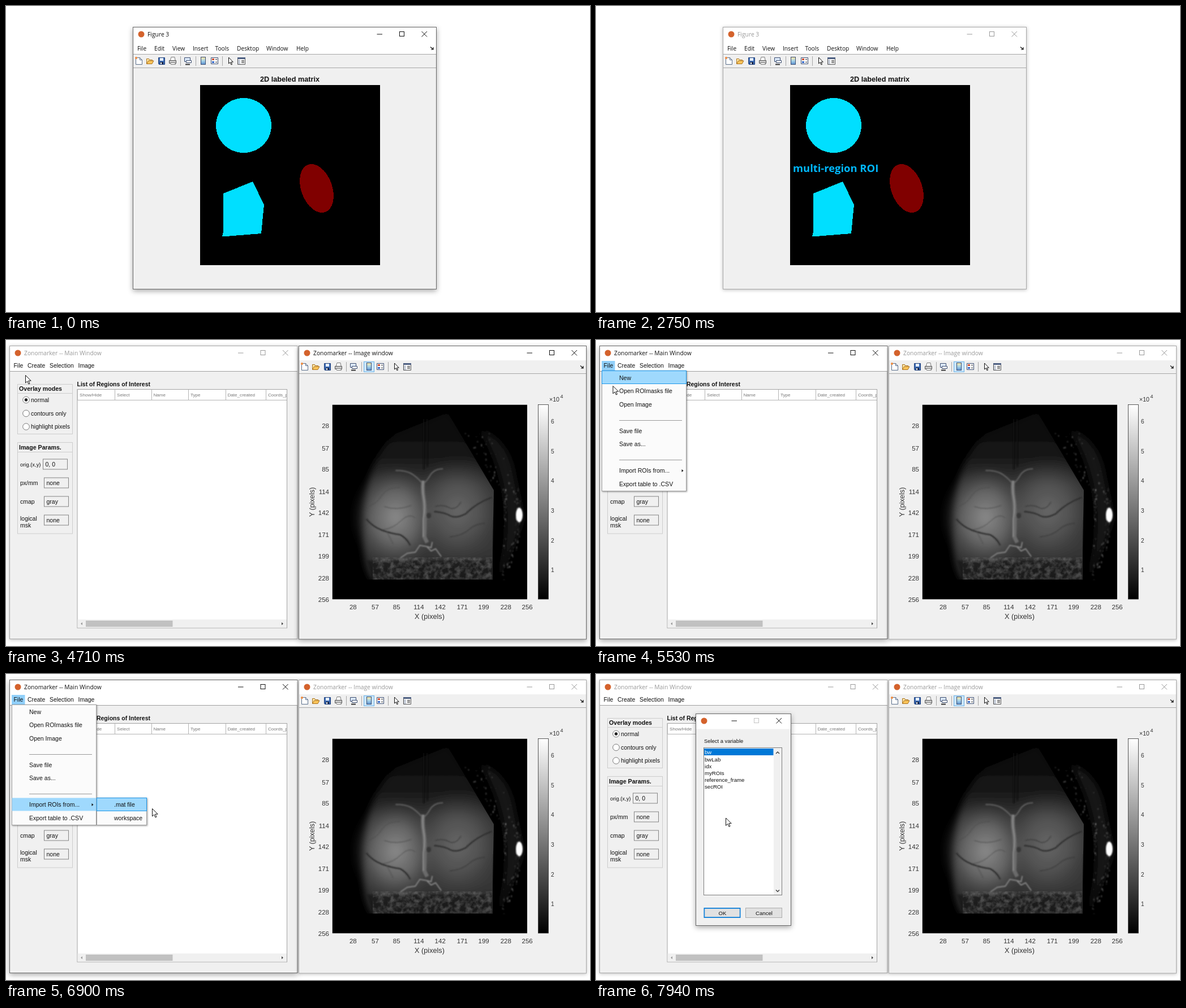
Recreate the animation shown at these times as an HTML page. Size 1032 by 542 pixels, loop 8 s.

```html
<!DOCTYPE html>
<html lang="en">
<head>
<meta charset="utf-8">
<title>Region tool demo</title>
<style>
html, body { margin: 0; width: 100%; height: 100%; overflow: hidden; background: #fff; }
svg { display: block; }
text { font-family: "Liberation Sans", Arial, sans-serif; font-variant-ligatures: none; white-space: pre; fill: #111; }
.ui { font-family: "Open Sans", "Noto Sans", sans-serif; }
.b { font-weight: 700; }
.frame { fill: #f0f0f0; stroke: #686868; filter: drop-shadow(0 3px 5px rgba(0,0,0,.34)); }
.off > .frame { stroke: #a8a8a8; filter: drop-shadow(0 1px 3px rgba(0,0,0,.26)); }
.btn { fill: none; stroke: #111; }
.off > .btn { stroke: #999; }
.off > .cap { fill: #999; }
.axis { fill: #333; }
.head { fill: #777; }
</style>
</head>
<body>
<svg id="stage" width="100%" height="100%" viewBox="0 0 1032 542"></svg>
<script>
const LOOP = 8000;
const APP = 'Zonomarker';

const text = (x, y, s, size = 10.5, attrs = '') =>
  `<text x="${x}" y="${y + size * .36}" font-size="${size}" ${attrs}>${s}</text>`;
const box = (x, y, w, h, fill, stroke = 'none') =>
  `<rect x="${x}" y="${y}" width="${w}" height="${h}" fill="${fill}" stroke="${stroke}"/>`;
const path = (d, stroke, width = 1, fill = 'none') =>
  `<path d="${d}" fill="${fill}" stroke="${stroke}" stroke-width="${width}"/>`;
const group = (id, body) => `<g id="${id}">${body}</g>`;

// Window chrome; body is drawn in stage coordinates.
function win(id, x, y, w, h, barHeight, title, body) {
  const r = x + w, cy = y + 12.5;
  const maxColor = title ? '' : 'style="stroke:#c4c4c4"';
  return `<g id="${id}"><rect class="frame" x="${x}" y="${y}" width="${w}" height="${h}"/>
    ${box(x + .5, y + .5, w - 1, barHeight, '#fff')}
    <circle cx="${x + 14.5}" cy="${cy}" r="5.5" fill="#d4622c"/>
    <text class="ui cap" x="${x + 25.5}" y="${cy + 4}" font-size="10.3">${title}</text>
    <path class="btn" d="M${r - 105} ${cy}h9.5M${r - 26} ${cy - 5}l9.5 9.5m0-9.5l-9.5 9.5"/>
    <rect class="btn" ${maxColor} x="${r - 65}" y="${cy - 4.5}" width="8" height="8"/>
    ${body}</g>`;
}

const icons = group('icons',
  path('M229.5 91.5h7l4 4v8h-11z', '#5a6f8c', 1, '#fff') + path('M236.5 91.5v4h4', '#5a6f8c') +
  '<circle cx="230" cy="92" r="2" fill="#f08a3c"/>' +
  path('M248.5 102.5v-9h4l1 2h5v2', '#a9711f', 1, '#ffe9a8') + path('M248.5 102.5l3-5.5h9.5l-3 5.5z', '#a9711f', 1, '#fbc55a') +
  path('M269.5 91.5h11v12h-10l-1-1z', '#1d3d78', 1, '#3c6bb5') + box(272, 92, 6, 5, '#e8f1fb') + box(272, 99, 6, 4, '#1b2c4c') + box(273, 100, 2, 3, '#fff') +
  path('M290.5 96l1.5-5.5h6l1 5.5', '#777', 1, '#fff') + path('M288.5 96.5h12v5h-12z', '#555', 1, '#c8c8c8') + path('M290.5 100.5h8l1 3h-8z', '#777', 1, '#fff') +
  path('M308.5 89v17M335.5 89v17M382.5 89v17', '#a6a6a6') +
  path('M315.5 91.5h10v7h-10z', '#3b4d70', 1, '#dce9fa') + path('M318.5 96.5h9v4h-9z', '#3b4d70', 1, '#fff') + path('M317 103.5h8', '#333', 2) +
  '<rect x="344.5" y="90.5" width="8" height="13" fill="url(#bar)" stroke="#3b4d70"/>' +
  path('M362.5 91.5h12v11h-12z', '#3b4d70', 1, '#fff') + box(364, 93, 4, 3, '#d55032') + box(364, 98, 4, 3, '#3266c8') + path('M370 94.5h3M370 99.5h3', '#333') +
  path('M393.5 91v11l2.5-2.3 2 4.3 1.6-.8-1.9-4h3.6z', '#111', 1, '#fff') +
  path('M409.5 91.5h13v12h-13z', '#555', 1, '#fff') + box(409, 91, 14, 3, '#4b5d80') + box(410, 95, 4, 8, '#c9cfda') + path('M416 96.5h5M416 98.5h5M416 100.5h5', '#444'));
const dockArrow = (x, y) => path(`M${x} ${y}l5 4.5m0-4v4h-4`, '#111', 1.2);

const menuBar = (items, y, cls, size) => items.map(([x, s]) => text(x, y, s, size, `class="${cls}"`)).join('');

const figure = win('fig', 224.5, 37.5, 536, 464, 48, 'Figure 3',
  menuBar([[232, 'File'], [262, 'Edit'], [294, 'View'], [330, 'Insert'], [369.5, 'Tools'], [408, 'Desktop'], [460, 'Window'], [513, 'Help']], 75, 'ui', 10.2) +
  path('M225 85.5h535M225 109.5h535', '#a6a6a6') + icons + dockArrow(750, 72.5) +
  text(501.5, 129.5, '2D labeled matrix', 12.7, 'class="b" text-anchor="middle"') +
  `<g shape-rendering="crispEdges">${box(343, 140, 318, 318.5, '#000')}
    <ellipse cx="420" cy="211.5" rx="49" ry="48.5" fill="#00dfff"/>
    <path d="M384 332L436 311L456 352L451 403L382 408.5L384 400Z" fill="#00dfff"/>
    <ellipse rx="44.7" ry="27.4" transform="translate(549 323) rotate(70)" fill="#800000"/></g>` +
  text(348, 287.8, 'multi-region ROI', 18.4, 'id="caption" class="ui b" style="fill:#00b9ff"'));

function field(y, label, value, x = 67, size = 10.5) {
  return text(25, y, label, size) + box(x + .5, y - 9.5, 43, 18, '#f0f0f0', '#858585') + text(x + 4.5, y, value);
}
const radio = (y, s, on) => `<circle cx="35.5" cy="${y}" r="5.8" fill="#fff" stroke="#777"/>` +
  (on ? `<circle cx="35.5" cy="${y}" r="2.7" fill="#222"/>` : '') + text(44, y, s);

const columns = [[4, 'Show/Hide'], [70, 'Select'], [134.5, 'Name'], [200, 'Type'], [265.5, 'Date_created'], [337, 'Coords_px']];
const table = box(126, 87.5, 370.5, 422.5, '#fff', '#a4a4a4') +
  `<svg x="126" y="87" width="370" height="21">${columns.map(([x, s]) =>
    text(x, 10, s, 8.1, 'class="head"') + path(`M${Math.round(x - 4) + .5} 1v19`, '#b4b4b4')).join('')}
    ${path('M0 19.5h370', '#b4b4b4')}</svg>` +
  box(126.5, 495, 369.5, 14.5, '#f0f0f0') + box(141, 497, 153.5, 11, '#c1c1c1') +
  path('M135 500v5l-3-2.5z', 'none', 0, '#999') + path('M487 500v5l3-2.5z', 'none', 0, '#444');

const mainWindow = win('main', 6.5, 10.5, 508.5, 519, 44.5, `${APP} -- Main Window`,
  path('M7 55.5h508', '#a0a0a0') + '<rect id="fileTab" x="10" y="37" width="23.5" height="17" fill="#91d0fa"/>' +
  menuBar([[13.5, 'File'], [38, 'Create'], [77, 'Selection'], [127.5, 'Image']], 45, '', 10.4) +
  box(20.5, 78.5, 97, 88, 'none', '#cdcdcd') + path('M21 94.5h97', '#cdcdcd') + text(23, 86, 'Overlay modes', 10.6, 'class="b"') +
  radio(106, 'normal', true) + radio(130, 'contours only') + radio(153.5, 'highlight pixels') +
  box(20.5, 181.5, 97, 161.5, 'none', '#cdcdcd') + path('M21 198.5h97', '#cdcdcd') + text(23, 190, 'Image Params.', 10.6, 'class="b"') +
  field(220.5, 'orig.(x,y)', '0, 0', 65, 9.4) + field(253.5, 'px/mm', 'none') + field(286.5, 'cmap', 'gray') +
  field(319.5, '', 'none') + text(25, 316, 'logical') + text(25, 328, 'msk') +
  text(125.5, 78, 'List of Regions of Interest', 10.5, 'class="b"') + table);

function seeded(seed) {
  return () => (seed = (seed * 16807) % 2147483647) / 2147483647;
}

// Soft gradient stand-in for the microscope picture.
function picture() {
  const rnd = seeded(41);
  let specks = '';
  for (let i = 0; i < 150; i++) {
    const s = rnd(), inner = i % 4 === 0;
    const y = inner ? 150 + s * 160 : 45 + s * 245;
    const edge = 336 - 62 * ((y - 195) / 150) ** 2;
    const x = inner ? 304 - s * 4 + rnd() * 5 : edge - rnd() * (y < 150 ? 48 : 12);
    const shade = Math.round(35 + 110 * rnd() ** 2);
    specks += `<rect x="${x.toFixed(1)}" y="${y.toFixed(1)}" width="${(1 + rnd()).toFixed(1)}" height="${(1 + 3 * rnd()).toFixed(1)}" fill="rgb(${shade},${shade},${shade})"/>`;
  }
  const glow = (id, x, y, rx, ry) => `<ellipse cx="${x}" cy="${y}" rx="${rx}" ry="${ry}" fill="url(#${id})"/>`;
  const veins = path('M60 203q12 14 28 20t32 8q12 6 18 19', '#2c2c2c', 2.4) +
    path('M180 190q18 1 28 7t28-3q20-20 46-29', '#2c2c2c', 2.2) +
    path('M182 181q14-4 25 2t21-10M208 235q22-2 34-13t28-11', '#383838', 1.2) +
    path('M62 182q18-7 26-21t32-14M92 181q22 8 48-2M90 222q18-2 32-16t25-5M96 224l12 24', '#4a4a4a', 1) +
    path('M162 25v90M168 25v85', '#0b0b0b', 2);
  const bright = path('M112 117q18 0 27 5t19 16M196 114q-16 0-23 12t-10 12', '#5e5e5e', 2.4) +
    path('M161 135q-2 15 1 32t1 68l5 10', '#6a6a6a', 7) + path('M161 135q-2 15 1 32t-1 36v32', '#8c8c8c', 2) +
    path('M121 272l12-8 14-2 8-12 12 2 8 2 2-10M167 252l8 8 8-4 10 14', '#858585', 2);
  return `<svg x="576.5" y="114.5" width="344.5" height="345" viewBox="0 0 345 346" preserveAspectRatio="none"><rect width="345" height="346"/>
    <g clip-path="url(#edge)"><g filter="url(#soft)">
      <path d="M204 14L300 155V318H76Q54 300 54 225Q54 105 112 52Z" fill="url(#tissue)"/>
      ${glow('glowA', 112, 200, 78, 92)}${glow('glowB', 222, 188, 85, 98)}</g>
      <g filter="url(#fine)">${veins}${bright}</g>
      <path d="M62 277H290V308H72Z" fill="#0c0c0c" opacity=".5" filter="url(#fine)"/>
      <rect x="72" y="272" width="211" height="39" filter="url(#mottle)" opacity=".4"/>
      <ellipse cx="171" cy="197" rx="4" ry="5" fill="#383838" filter="url(#fine)"/></g>
    <path d="M262 45Q310 60 322 120T338 195T290 318Q312 250 306 180T262 45" fill="#141414" filter="url(#soft)"/>
    <g filter="url(#fine)">${specks}<ellipse cx="331" cy="196" rx="6" ry="13" fill="#fff"/></g>
    ${path('M283.5 205V311', '#303030', .8)}</svg>`;
}

const ticks = [28, 57, 85, 114, 142, 171, 199, 228, 256];
const tickLabels = ticks.map(v => {
  const p = v * 1.35;
  return text(571, 114.5 + p, v, 11.5, 'class="axis" text-anchor="end"') + text(575.5 + p, 472.5, v, 11.5, 'class="axis" text-anchor="middle"');
}).join('');
const barLabels = [1, 2, 3, 4, 5, 6].map(v => text(963, 460.5 - v * 52.7, v, 10.2, 'class="axis"')).join('');

const imageWindow = win('image', 517.5, 10.5, 508, 519.5, 25, `${APP} -- Image window`,
  path('M518 59.5h507', '#a6a6a6') + box(632.5, 38.5, 18, 18, '#cce6fb', '#6cb4e8') +
  '<use href="#icons" x="293" y="-50"/>' + dockArrow(1015, 45.5) +
  picture() + tickLabels + text(748.5, 489, 'X (pixels)', 12.7, 'class="axis" text-anchor="middle"') +
  `<g transform="translate(540.5 287) rotate(-90)">${text(0, 0, 'Y (pixels)', 12.7, 'class="axis" text-anchor="middle"')}</g>` +
  '<rect x="940.5" y="114.5" width="18" height="344.5" fill="url(#gray)" stroke="#333" stroke-width=".8"/>' + barLabels +
  text(960, 105, '×10', 10.6, 'class="axis"') + text(979.5, 100, '4', 9, 'class="axis"'));

const ROW = 23.55;
const menuItems = ['New', 'Open ROImasks file', 'Open Image', '', 'Save file', 'Save as...', '', 'Import ROIs from...', 'Export table to .CSV'];
const panel = (x, y, w, h) => `<rect x="${x}" y="${y}" width="${w}" height="${h}" fill="#fbfbfb" stroke="#a0a0a0" style="filter:drop-shadow(1px 1px 1.5px rgba(0,0,0,.4))"/>`;
const highlight = (id, x, w) => `<rect id="${id}" x="${x}" width="${w}" height="23" fill="#9fd9fd" stroke="#1c97ea"/>`;
const menu = group('menu', panel(10.5, 54.5, 149, 213) + highlight('menuMark', 10.5, 149) +
  menuItems.map((s, i) => s ? text(41, 66.8 + i * ROW, s) : path(`M41 ${Math.round(72 + i * ROW) - .5}h111`, '#999')).join('') +
  path('M151.5 229v5l3-2.5z', 'none', 0, '#111'));
const submenu = group('submenu', panel(160.5, 219.5, 88, 48) + highlight('subMark', 160.5, 88) +
  text(191, 231.5, '.mat file') + text(191, 255, 'workspace'));

const variables = ['bw', 'bwLab', 'idx', 'myROIs', 'reference_frame', 'secROI'];
const dialog = win('dialog', 176.5, 70.5, 168, 375, 26.5, '',
  text(191, 119, 'Select a variable', 9.4) + box(190.5, 130.5, 138, 261, '#fff', '#7d7d7d') +
  box(191, 132, 122.5, 12, '#0078d7') + box(314, 131, 14, 260, '#f0f0f0') +
  path('M318 141l3-3 3 3M318 382.5l3 3 3-3', '#444', 1.5) +
  variables.map((s, i) => text(192, 139 + i * 12.2, s, 9.6, i ? '' : 'style="fill:#fff"')).join('') +
  box(191, 414.5, 64, 17, '#e1e1e1', '#0078d7') + box(191.7, 415.2, 62.6, 15.6, 'none', '#0078d7') + box(264.5, 414.5, 64, 17, '#e1e1e1', '#adadad') +
  text(223.5, 423.5, 'OK', 9.6, 'text-anchor="middle"') + text(297, 423.5, 'Cancel', 9.6, 'text-anchor="middle"'));

const gradient = (id, attrs, stops, kind = 'linear') => `<${kind}Gradient id="${id}" ${attrs}>${stops.map(([o, c, a = 1]) =>
  `<stop offset="${o}" stop-color="${c}" stop-opacity="${a}"/>`).join('')}</${kind}Gradient>`;
const down = 'x1="0" y1="0" x2="0" y2="1"';
const defs = `<defs>
  ${gradient('bar', down, [[0, '#ffe9a0'], [.5, '#a8d4e8'], [1, '#5b8fd0']])}
  ${gradient('gray', down, [[0, '#fff'], [1, '#000']])}
  ${gradient('tissue', down, [[0, '#080808'], [.25, '#161616'], [.42, '#343434'], [.8, '#363636'], [1, '#242424']])}
  ${gradient('glowA', '', [[0, '#949494', .9], [.5, '#848484', .6], [1, '#555', 0]], 'radial')}
  ${gradient('glowB', '', [[0, '#747474', .8], [.5, '#666', .55], [1, '#444', 0]], 'radial')}
  <clipPath id="edge"><path d="M0 0H196L286 152L283 311H0Z"/></clipPath>
  <filter id="soft"><feGaussianBlur stdDeviation="6"/></filter>
  <filter id="fine"><feGaussianBlur stdDeviation=".9"/></filter>
  <filter id="mottle" x="0" y="0" width="1" height="1"><feTurbulence type="fractalNoise" baseFrequency=".11" numOctaves="3" seed="4"/>
    <feColorMatrix values="0 0 0 0 .28  0 0 0 0 .28  0 0 0 0 .28  2.5 0 0 0 -.9"/></filter>
</defs>`;

document.getElementById('stage').innerHTML = defs + box(0, 0, 1032, 542, '#fff') +
  figure + group('desk', mainWindow + imageWindow + menu + submenu + dialog) +
  group('cursor', path('M.5.5v13.5l3.2-3 2.3 5 2-.9-2.2-4.9h4.4z', '#111', 1, '#fff'));
// Keep the shared icons available while the figure window is hidden.
document.querySelector('defs').append(document.getElementById('icons').cloneNode(true));

const el = id => document.getElementById(id);
const show = (id, on) => { el(id).style.display = on ? '' : 'none'; };
const setActive = (id, on) => el(id).classList.toggle('off', !on);

const route = [
  [3950, 319, 436], [4710, 34, 62], [4860, 20, 45], [5320, 20, 45], [5530, 29.5, 81],
  [6220, 100, 228], [6420, 100, 228], [6900, 258, 238], [7180, 220, 249], [7400, 220, 249], [7700, 229, 254.5]
];
function cursorAt(t) {
  const i = route.findIndex(k => k[0] > t);
  if (i < 1) return (i ? route[route.length - 1] : route[0]).slice(1);
  const [t0, x0, y0] = route[i - 1], [t1, x1, y1] = route[i];
  const u = (t - t0) / (t1 - t0), e = u * u * (3 - 2 * u);
  return [x0 + (x1 - x0) * e, y0 + (y1 - y0) * e];
}

const flashes = [1130, 1670, 2210, 2750];
const MENU_OPEN = 5250, SUB_OPEN = 6150, MENU_CLOSE = 7250, DIALOG_OPEN = 7530;

function render(t) {
  const onDesk = t >= 3420;
  show('fig', !onDesk);
  show('desk', onDesk);
  show('caption', t >= 730 && t < 3090);
  setActive('fig', !flashes.some(f => t >= f && t < f + 70));

  const menuOn = t >= MENU_OPEN && t < MENU_CLOSE, subOn = t >= SUB_OPEN && menuOn;
  setActive('image', t < MENU_OPEN);
  setActive('main', t >= MENU_OPEN && t < DIALOG_OPEN);
  show('fileTab', menuOn);
  show('menu', menuOn);
  show('submenu', subOn);
  show('dialog', t >= DIALOG_OPEN);

  // Highlights trail the pointer slightly.
  const [hx, hy] = cursorAt(t - 70);
  const row = subOn ? 7 : Math.min(8, Math.max(0, Math.floor((hy - 55) / ROW)));
  el('menuMark').setAttribute('y', 54.5 + Math.round(row * ROW));
  el('menuMark').setAttribute('stroke', subOn ? 'none' : '#1c97ea');
  show('menuMark', menuItems[row]);
  el('subMark').setAttribute('y', hy > 243 ? 243.5 : 219.5);
  show('subMark', hx > 160);

  const [x, y] = cursorAt(t);
  show('cursor', t >= 3950);
  el('cursor').setAttribute('transform', `translate(${x.toFixed(1)} ${y.toFixed(1)})`);
}

const start = performance.now();
function tick() {
  render((performance.now() - start) % LOOP);
  requestAnimationFrame(tick);
}
tick();
</script>
</body>
</html>
```
